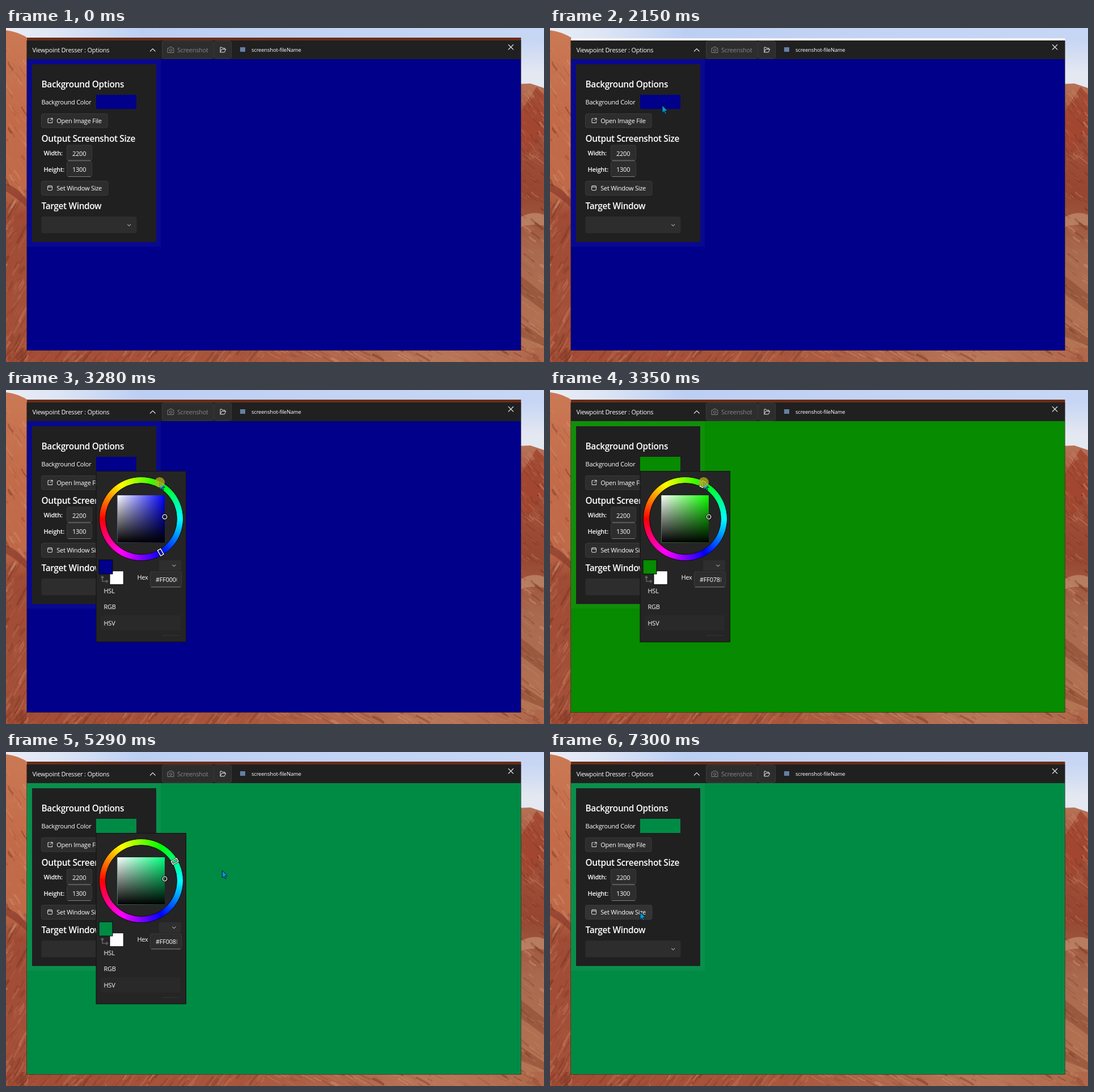
An HTML page that plays this animation: 949 px wide and 590 px high, repeating every 8 s.

```html
<!DOCTYPE html>
<html lang="en">
<head>
<meta charset="utf-8">
<title>Background color picker</title>
<style>
  html, body { margin: 0; width: 100%; height: 100%; overflow: hidden; background: #a8573c; }
  svg { display: block; width: 100vw; height: 100vh; }
  text { font: 11px "Open Sans", "Noto Sans", sans-serif; letter-spacing: -.022em; fill: #fff; white-space: pre; }
  .head { font-size: 15.4px; font-weight: 600; }
  .label { font-weight: 600; }
  .file { font-size: 9.5px; }
  .dim { fill: #858585; }
  .btn { fill: #2d2d2d; stroke: #3b3b3b; }
  .line { fill: none; stroke: #e6e6e6; stroke-linecap: round; stroke-linejoin: round; }
  .off { stroke: #858585; }
</style>
</head>
<body>
<svg viewBox="0 0 949 590" preserveAspectRatio="none">
  <defs>
    <linearGradient id="sky">
      <stop stop-color="#e9edf6"/><stop offset=".1" stop-color="#dde5f5"/><stop offset=".25" stop-color="#bccff3"/>
      <stop offset=".6" stop-color="#c3d3f4"/><stop offset="1" stop-color="#c6d6f4"/>
    </linearGradient>
    <linearGradient id="haze" x2="0" y2="1">
      <stop stop-color="#e4e8f1" stop-opacity="0"/><stop offset=".6" stop-color="#e4e8f1"/>
    </linearGradient>
    <linearGradient id="slope" x2="0" y2="1">
      <stop stop-color="#cb7955"/><stop offset=".25" stop-color="#c36b49"/><stop offset=".47" stop-color="#c06a49"/>
      <stop offset=".56" stop-color="#a04b35"/><stop offset="1" stop-color="#a6513a"/>
    </linearGradient>
    <linearGradient id="ridge" x2="0" y2="1">
      <stop stop-color="#b77357"/><stop offset=".12" stop-color="#a6523b"/><stop offset=".4" stop-color="#964631"/>
      <stop offset=".6" stop-color="#a9694f"/><stop offset="1" stop-color="#b67553"/>
    </linearGradient>
    <linearGradient id="ground">
      <stop stop-color="#a34b34"/><stop offset=".45" stop-color="#a9573d"/><stop offset=".8" stop-color="#b87658"/>
      <stop offset="1" stop-color="#b0674a"/>
    </linearGradient>
    <linearGradient id="toWhite">
      <stop stop-color="#fff"/><stop offset="1" stop-color="#fff" stop-opacity="0"/>
    </linearGradient>
    <linearGradient id="toBlack" x2="0" y2="1">
      <stop stop-opacity="0"/><stop offset="1"/>
    </linearGradient>
    <clipPath id="hexClip"><rect x="259" y="322" width="42.5" height="25"/></clipPath>
    <clipPath id="leftClip"><path d="M0 4Q24 7 40 19V590H0z"/></clipPath>
    <clipPath id="rightClip"><path d="M900 99L925 98L949 106V590H900z"/></clipPath>
    <clipPath id="baseClip"><path d="M0 565H949V590H0z"/></clipPath>
  </defs>

  <rect width="949" height="120" fill="url(#sky)"/>
  <rect x="900" y="20" width="49" height="100" fill="url(#haze)"/>
  <path d="M0 4Q24 7 40 19V590H0z" fill="url(#slope)"/>
  <path d="M900 99L925 98L949 106V590H900z" fill="url(#ridge)"/>
  <path d="M0 565H949V590H0z" fill="url(#ground)"/>
  <path d="M0 274Q20 282 38 304V318Q18 298 0 289z" fill="#86392a" opacity=".65"/>
  <path d="M908 148L936 104L949 118V190L922 222L908 205z" fill="#a2432e" opacity=".75"/>
  <path d="M908 334Q930 322 949 330V349Q925 345 908 352z" fill="#c48f70" opacity=".7"/>
  <path d="M908 438L949 470V500L908 470zM908 520L949 548V562L908 545z" fill="#87472f" opacity=".5"/>
  <g id="rocks" fill="none" stroke-linecap="round"></g>

  <!-- window -->
  <rect id="strip" x="37" y="17" width="871.5" height="6"/>
  <rect id="stage" x="37" y="54" width="871" height="515.5"/>
  <path d="M36.5 22V569.5H908.5V22" fill="none" stroke="#33201b" stroke-opacity=".6"/>
  <rect x="37" y="22" width="871" height="33" fill="#202020"/>
  <text x="46.5" y="43">Viewpoint Dresser : Options</text>
  <path class="line" d="M254.5 41l4.3-4.4 4.3 4.4" stroke-width="1.2"/>
  <rect class="btn" x="275.5" y="23" width="90" height="31" rx="3"/>
  <g class="line off">
    <path d="M285.5 35.5h2.2l1.2-2h3.6l1.2 2h2.1v8h-10.3z"/><circle cx="290.6" cy="39.2" r="2.1"/>
  </g>
  <text class="dim" x="302" y="43">Screenshot</text>
  <rect class="btn" x="367.5" y="23" width="30" height="31" rx="3" stroke="#484848"/>
  <path class="line" d="M378 42.5v-8.5h3l1.3 1.6h3.7v2M378 42.5l2.4-4.9h7.4l-2.4 4.9z"/>
  <rect x="413" y="34" width="9" height="8" fill="#667fa5"/>
  <text class="file" x="433" y="41.5">screenshot-fileName</text>
  <path class="line" d="M886.3 29.5l8.5 8.5m0-8.5l-8.5 8.5" stroke-width="1.1"/>

  <!-- options -->
  <rect x="37" y="55" width="236" height="331" fill="#fff" opacity=".035"/>
  <rect x="46" y="64" width="219" height="314" fill="#202020"/>
  <text class="head" x="62.5" y="104.7">Background Options</text>
  <text x="62.5" y="135.3">Background Color</text>
  <rect id="chip" x="159" y="118" width="71" height="25"/>
  <rect class="btn" x="62.5" y="151.5" width="116.5" height="24.5" rx="3"/>
  <path class="line" d="M76.5 160h-2.5v7.5h7.5v-2.5M78.5 159.5h3.5v3.5M82 159.5l-4.3 4.3"/>
  <text x="89.3" y="167.8">Open Image File</text>
  <text class="head" x="62.5" y="201.2">Output Screenshot Size</text>
  <text class="label" x="66.5" y="225.3">Width:</text>
  <text class="label" x="66.5" y="253.5">Height:</text>
  <g id="fields"></g>
  <text x="117" y="225.5">2200</text>
  <text x="117" y="253.7">1300</text>
  <rect id="sizeBtn" class="btn" x="62.5" y="270.5" width="117.5" height="25" rx="3"/>
  <path class="line" d="M75 278.7h5q1.5 0 1.5 1.5v5q0 1.5-1.5 1.5h-5q-1.5 0-1.5-1.5v-5q0-1.5 1.5-1.5M73.7 281h7.6"/>
  <text x="89.3" y="287.3">Set Window Size</text>
  <text class="head" x="62.5" y="320.3">Target Window</text>
  <rect x="62.5" y="333" width="168" height="29.5" rx="3" fill="#2d2d2d"/>
  <path class="line" d="M214.5 347l2.7 2.6 2.7-2.6"/>

  <!-- picker -->
  <g id="popup">
    <rect x="159" y="143.5" width="158.5" height="301.5" fill="#252525" stroke="#111"/>
    <g id="wheel"></g>
    <g fill="none" stroke="#0c0c0c"><circle cx="238.5" cy="227.5" r="74"/><circle cx="238.5" cy="227.5" r="63"/></g>
    <g id="hueMark" fill="none">
      <rect x="-5.5" y="-3" width="11" height="6" stroke="#111" stroke-width="3"/>
      <rect x="-5.5" y="-3" width="11" height="6" stroke="#fff" stroke-width="1.4"/>
    </g>
    <rect id="pure" x="196.5" y="186" width="83.5" height="83.5"/>
    <rect x="196.5" y="186" width="83.5" height="83.5" fill="url(#toWhite)"/>
    <rect x="196.5" y="186" width="83.5" height="83.5" fill="url(#toBlack)"/>
    <circle cx="280" cy="224" r="4" fill="none" stroke="#080808" stroke-width="3"/>
    <circle cx="280" cy="224" r="3.8" fill="none" stroke="#fff" stroke-width="1.3"/>
    <rect x="183" y="319.7" width="24.3" height="24" fill="#fff" stroke="#080808"/>
    <rect id="primary" x="164" y="300" width="24" height="25" stroke="#080808"/>
    <path d="M170 330v8h8M167.5 332l2.5-3 2.5 3M176.5 335.5l3 2.5-3 2.5" fill="none" stroke="#646464" stroke-width="1.6"/>
    <rect x="270" y="300.5" width="39" height="18.5" rx="2" fill="#2e2e2e"/>
    <path class="line" d="M293.7 309l2.7 2.6 2.7-2.6"/>
    <text x="231.5" y="335.3">Hex</text>
    <rect class="btn" x="254.5" y="321" width="55" height="27" rx="3" stroke="#444"/>
    <path d="M256 348h52" stroke="#808080"/>
    <text id="hex" x="264" y="338.5" clip-path="url(#hexClip)"></text>
    <rect x="167" y="398" width="141" height="27" rx="3" fill="#292929"/>
    <text x="172.5" y="358.7">HSL</text>
    <text x="172.5" y="387">RGB</text>
    <text x="172.5" y="415.6">HSV</text>
    <path d="M276 433.7h30" stroke="#383838"/>
  </g>

  <g id="cursor">
    <path d="M0 0V13L3.2 10.5L5.4 14.7L7.3 13.7L5.2 9.6L9.4 9.2z" fill="#0d93d2" stroke="#06202f"/>
    <circle id="press" r="9" fill="#b9b51c" opacity=".72"/>
  </g>
</svg>
<script>
const $ = id => document.getElementById(id);
const LOOP = 8000, CX = 238.5, CY = 227.5;

function add(parent, tag, attrs) {
  const node = document.createElementNS("http://www.w3.org/2000/svg", tag);
  for (const k in attrs) node.setAttribute(k, attrs[k]);
  return parent.appendChild(node);
}

let seed = 7;
const rand = () => (seed = seed * 16807 % 2147483647) / 2147483647;

// Weathered streaks on the slopes around the window.
function streaks(clip, n, x, y, w, h, dx, dy) {
  const layer = add($("rocks"), "g", { "clip-path": `url(#${clip})` });
  const tones = ["#6f3020", "#82402c", "#c4805f", "#d39c7c"];
  for (let i = 0; i < n; i++) {
    const k = .3 + rand(), bend = rand() * 8 - 4;
    add(layer, "path", {
      d: `M${(x + rand() * w).toFixed(1)} ${(y + rand() * h).toFixed(1)}q${dx * k / 2 + bend} ${dy * k / 2} ${dx * k} ${dy * k}`,
      stroke: tones[Math.floor(rand() * 4)],
      "stroke-width": (.6 + rand() * rand() * 5).toFixed(1),
      opacity: (.12 + rand() * .35).toFixed(2)
    });
  }
}
streaks("leftClip", 70, -5, 30, 45, 260, 9, 14);
streaks("leftClip", 140, -5, 300, 45, 290, -11, 20);
streaks("rightClip", 80, 900, 105, 50, 120, 10, 12);
streaks("rightClip", 150, 895, 215, 60, 375, 14, 11);
streaks("baseClip", 150, 0, 560, 460, 28, -14, 18);
streaks("baseClip", 130, 460, 560, 489, 28, 18, 10);

for (const y of [207, 235.5]) {
  add($("fields"), "rect", { class: "btn", x: 107.5, y, width: 44, height: 27, rx: 3, stroke: "#505050" });
  add($("fields"), "path", { d: `M109.5 ${y + 27}h40`, stroke: "#808080" });
}

// Hue 0 sits at the left and grows clockwise.
const polar = (hue, r) => {
  const a = (hue + 180) * Math.PI / 180;
  return [CX + r * Math.cos(a), CY + r * Math.sin(a)];
};
for (let h = 0; h < 360; h += 3) {
  const a = polar(h - .3, 74), b = polar(h + 3.3, 74), c = polar(h + 3.3, 63), d = polar(h - .3, 63);
  add($("wheel"), "path", {
    d: `M${a}A74 74 0 0 1 ${b}L${c}A63 63 0 0 0 ${d}z`,
    fill: `hsl(${h + 1.5} 100% 50%)`
  });
}

function rgb(hue, v) {
  return [5, 3, 1].map(n => {
    const k = (n + hue / 60) % 6;
    return Math.floor(v * (1 - Math.max(0, Math.min(k, 4 - k, 1))));
  });
}
const toHex = c => c.map(n => n.toString(16).padStart(2, "0")).join("").toUpperCase();

// start, end, x, y at the end
const moves = [
  [790, 920, 371, 285],
  [1270, 1460, 253, 208],
  [1670, 2150, 198, 137],
  [2760, 3270, 271, 163],
  [3700, 4350, 303, 190],
  [5040, 5360, 392, 212],
  [5720, 5970, 267, 183],
  [6710, 7300, 159, 283]
];

function pointer(t) {
  let x = 555, y = 577;
  for (const [from, to, ex, ey] of moves) {
    if (t <= from) break;
    const p = Math.min(1, (t - from) / (to - from)), e = p * p * (3 - 2 * p);
    x += (ex - x) * e;
    y += (ey - y) * e;
  }
  return [x, y];
}

function hueAt(t) {
  if (t < 3350) return 240;
  const [x, y] = pointer(Math.min(t, 4490));
  return Math.atan2(y - CY, x - CX) * 180 / Math.PI + 180;
}

const within = (t, a, b) => t >= a && t < b;
const show = (id, on) => $(id).setAttribute("visibility", on ? "visible" : "hidden");

function draw(t) {
  const hue = hueAt(t), code = toHex(rgb(hue, 139.9)), [x, y] = pointer(t);
  for (const id of ["stage", "chip", "primary"]) $(id).setAttribute("fill", "#" + code);
  $("pure").setAttribute("fill", "#" + toHex(rgb(hue, 255)));
  $("hex").textContent = "#FF" + code;
  const [mx, my] = polar(hue, 68.5);
  $("hueMark").setAttribute("transform", `translate(${mx} ${my}) rotate(${hue})`);
  $("popup").style.display = within(t, 2430, 5580) ? "" : "none";

  const idle = within(t, 240, 2220);
  $("strip").setAttribute("fill", idle ? "#f7f7f7" : "#6a2d1a");
  $("strip").setAttribute("y", idle ? 18 : 17);

  const over = x > 62 && x < 180 && y > 270 && y < 296;
  $("sizeBtn").style.fill = over ? "#333" : "";
  $("cursor").setAttribute("transform", `translate(${x} ${y})`);
  show("cursor", t >= 790);
  show("press", within(t, 2370, 2430) || within(t, 3280, 4760) || within(t, 5510, 5580));
}

const begin = performance.now();
function tick() {
  draw((performance.now() - begin) % LOOP);
  requestAnimationFrame(tick);
}
tick();
</script>
</body>
</html>
```
